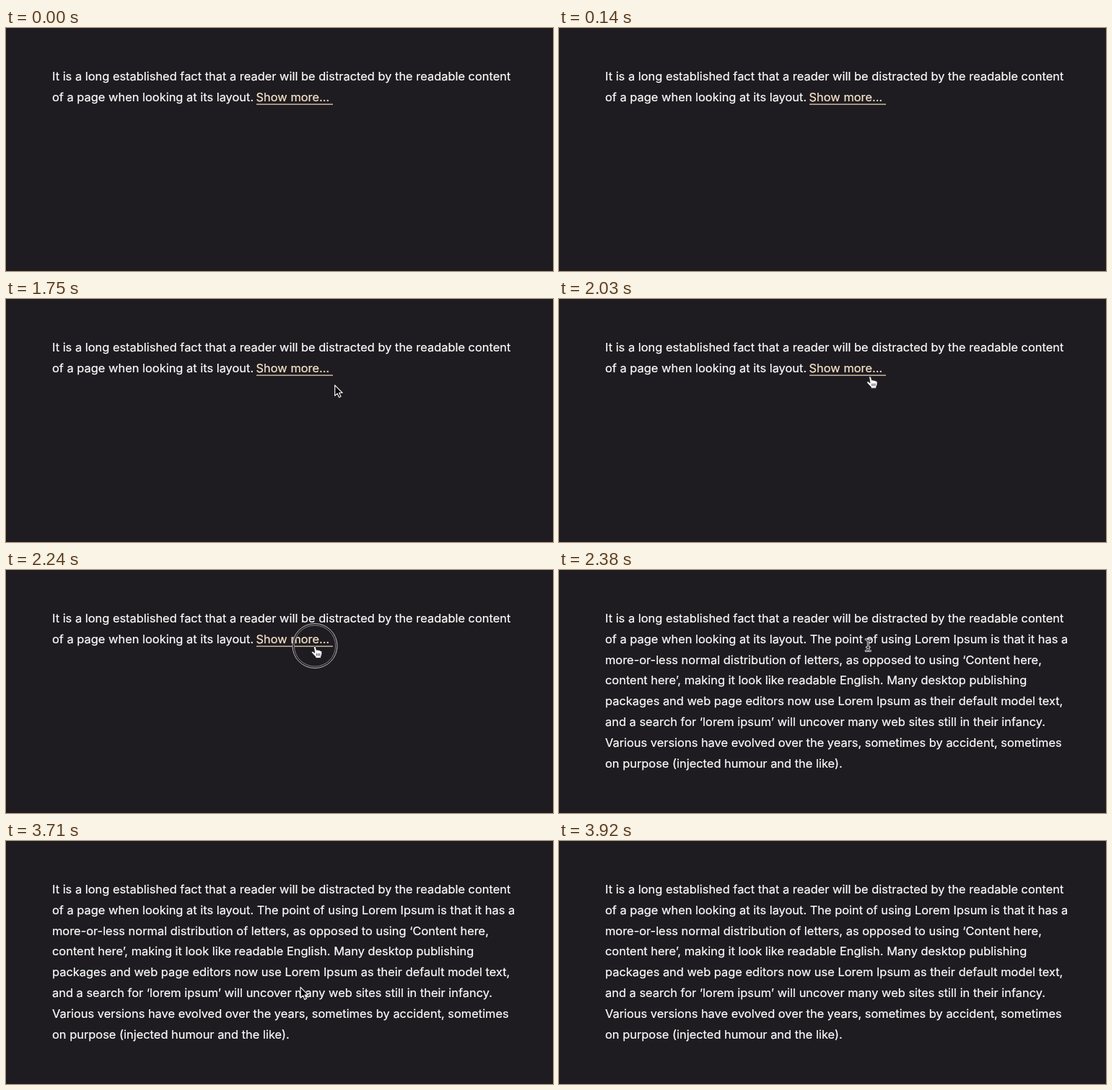
Recreate the animation shown at these times as an HTML page. Size 758 by 338 pixels, loop 3.99 s.

```html
<!DOCTYPE html>
<html lang="en">
<head>
<meta charset="utf-8">
<title>Show more</title>
<style>
  html, body { margin: 0; width: 100%; height: 100%; overflow: hidden; background: #1e1c20; }
  svg { display: block; width: 100%; height: 100%; }
  text {
    font: 16.415px Inter, "Open Sans", sans-serif;
    font-optical-sizing: none;
    fill: #fff;
    stroke: #fff;
    stroke-width: .2;
    white-space: pre;
  }
  #link text { fill: #fbe5cc; stroke: #fbe5cc; }
  #link path { stroke: #e9d3b8; stroke-width: 1.2; }
</style>
</head>
<body>
<svg viewBox="0 0 758 338">
  <defs>
    <path id="beamShape" d="M-3.2 -8Q0 -8 0 -5.5Q0 -8 3.2 -8M0 -6V6M-2 3H2M-3.2 8Q0 8 0 5.5Q0 8 3.2 8"/>
  </defs>
  <g id="short"></g>
  <g id="link">
    <text x="346.6" y="101.9">Show more...</text>
    <path d="M347 106.2H453"/>
  </g>
  <g id="full"></g>

  <g id="ring" fill="none" transform="translate(428 105.5)">
    <circle r="29.8" stroke="#1e1c20" stroke-width="3"/>
    <circle r="31" stroke="#bdbbbd"/>
    <circle r="28.6" stroke="#8f8d90" stroke-width=".9"/>
  </g>

  <g id="arrow" fill="#060507" stroke="#f2f2f2" stroke-width="1.2" stroke-linejoin="round">
    <path d="M.7 .8V15.6L4.2 12.4L6.5 17.8L9 16.7L6.7 11.5H11.2Z"/>
  </g>
  <g id="hand" fill="#fff" stroke="#1e1c20" stroke-width=".9" stroke-linejoin="round">
    <path d="M-1.6 1.6C-1.4 .4 .7 .3 1.2 1.6L2.4 6C3.2 5.2 4.7 5.5 5 6.4C6 5.7 7.2 6.2 7.5 7.1C8.8 6.7 9.8 7.5 9.8 8.8C10.1 12 9 13.7 8.4 15V17H1V15.3C-.8 13.5-2.4 11.5-4.3 9.5C-5.2 8.2-3.2 7-1.9 8.2L-.2 9.8Z"/>
    <path d="M2.6 10.4V14M4.7 10.4V14M6.8 10.4V14" stroke-width=".8"/>
  </g>
  <g id="beam" fill="none" stroke-linecap="round" transform="translate(428.3 104.6)">
    <use href="#beamShape" stroke="#f2f2f2" stroke-width="2.8"/>
    <use href="#beamShape" stroke="#060507"/>
  </g>
</svg>
<script>
const LOOP = 3990, STEP = 70;
const LINE_HEIGHT = 28.83;
const intro = [
  "It is a long established fact that a reader will be distracted by the readable content",
  "of a page when looking at its layout. "
];
const article = [
  intro[0],
  intro[1] + "The point of using Lorem Ipsum is that it has a",
  "more-or-less normal distribution of letters, as opposed to using ‘Content here,",
  "content here’, making it look like readable English. Many desktop publishing",
  "packages and web page editors now use Lorem Ipsum as their default model text,",
  "and a search for ‘lorem ipsum’ will uncover many web sites still in their infancy.",
  "Various versions have evolved over the years, sometimes by accident, sometimes",
  "on purpose (injected humour and the like)."
];

const $ = id => document.getElementById(id);
const show = (id, visible) => $(id).style.display = visible ? "" : "none";
const smooth = u => u * u * (3 - 2 * u);
const easeOut = u => 1 - (1 - u) ** 2;
const easeIn = u => u ** 1.6;

// Each leg: start time, end time, from, to, easing.
const legs = [
  [1400, 1750, [657, 160], [455, 119], smooth],
  [1750, 1890, [455, 119], [441, 112], easeOut],
  [1890, 2170, [441, 112], [428, 105.5], easeOut],
  [3500, 3850, [427.5, 105], [382, 326], easeIn]
];

function addLines(id, lines) {
  lines.forEach((line, i) => {
    const text = document.createElementNS("http://www.w3.org/2000/svg", "text");
    text.setAttribute("x", 64);
    text.setAttribute("y", 73 + i * LINE_HEIGHT);
    text.textContent = line;
    $(id).append(text);
  });
}

function pointerAt(t) {
  const [start, end, from, to, ease] = legs.filter(leg => leg[0] <= t).pop() || legs[0];
  const p = ease(Math.min(1, Math.max(0, (t - start) / (end - start))));
  return from.map((v, i) => v + (to[i] - v) * p);
}

function render(now) {
  const time = now % LOOP;
  const t = time - time % STEP;
  const within = (a, b) => t >= a && t < b;
  const expanded = t >= 2380;
  show("short", !expanded);
  show("link", !expanded);
  show("full", expanded);
  show("ring", within(2240, 2380));
  show("arrow", within(1400, 1960) || within(3500, 3920));
  show("hand", within(1960, 2380));
  show("beam", within(2380, 3500));
  const move = `translate(${pointerAt(t).join(" ")})`;
  $("arrow").setAttribute("transform", move);
  $("hand").setAttribute("transform", move);
}

addLines("short", intro);
addLines("full", article);
const began = performance.now();
function tick() {
  render(performance.now() - began);
  requestAnimationFrame(tick);
}
tick();
</script>
</body>
</html>
```
